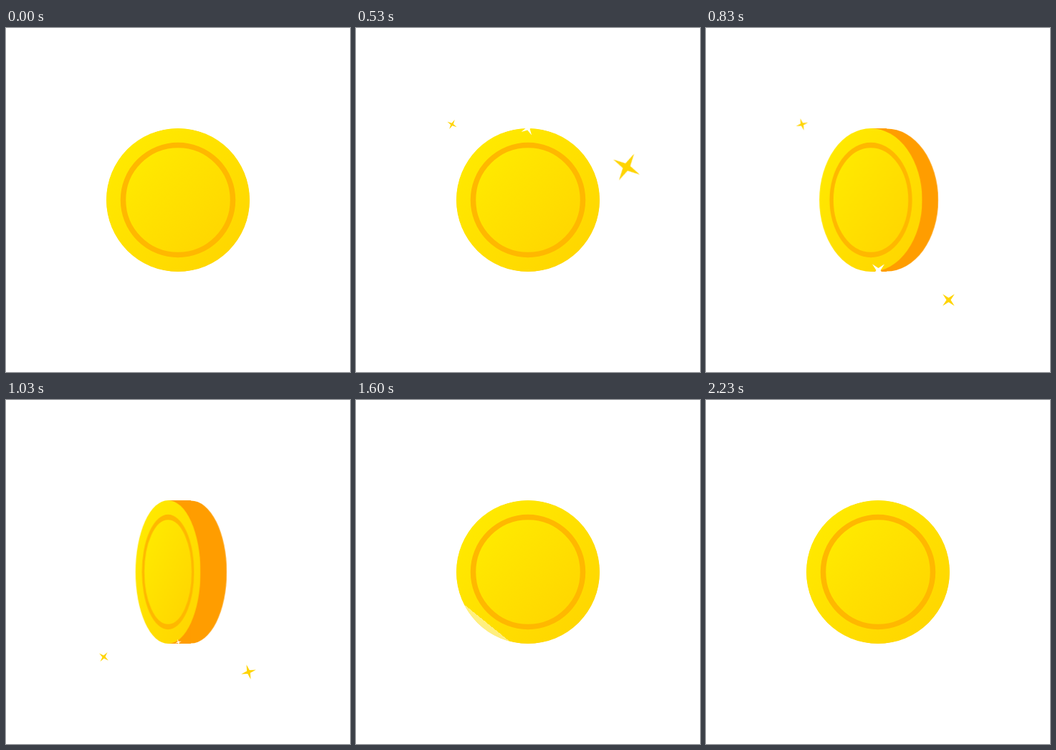
These frames come from a looping animation (480 px wide and 480 px high, 2560 ms). An HTML page without scripts:

```html
<!DOCTYPE html>
<html lang="en">
<head>
<meta charset="utf-8">
<title>Coin</title>
<style>
  html, body { margin: 0; width: 100%; height: 100%; overflow: hidden; background: #fff; }
  svg { display: block; width: 100vw; height: 100vh; }

  .face, .back, .rim, .shine { animation: 2.56s linear infinite; }
  .face { animation-name: face; }
  .back { animation-name: back; }
  .rim { animation-name: rim; }
  .shine { animation-name: sweep; }

  /* The coin tilts to the left and returns */
  @keyframes face {
    0%, 24.6% { transform: translateX(0) scaleX(1); animation-timing-function: ease-in; }
    32.42% { transform: translateX(-10px) scaleX(.72); animation-timing-function: ease-out; }
    41% { transform: translateX(-14px) scaleX(.45); animation-timing-function: ease-in; }
    48.05% { transform: translateX(-11px) scaleX(.66); animation-timing-function: ease-out; }
    57.4%, 100% { transform: translateX(0) scaleX(1); }
  }
  @keyframes back {
    0%, 24.6% { transform: translateX(0) scaleX(1); animation-timing-function: ease-in; }
    32.42% { transform: translateX(12px) scaleX(.725); animation-timing-function: ease-out; }
    41% { transform: translateX(18px) scaleX(.5); animation-timing-function: ease-in; }
    48.05% { transform: translateX(14px) scaleX(.72); animation-timing-function: ease-out; }
    57.4%, 100% { transform: translateX(0) scaleX(1); }
  }
  @keyframes rim {
    0%, 24.6% { transform: translateX(0) scaleX(0); animation-timing-function: ease-in; }
    32.42% { transform: translateX(-10px) scaleX(22); animation-timing-function: ease-out; }
    41% { transform: translateX(-14px) scaleX(32); animation-timing-function: ease-in; }
    48.05% { transform: translateX(-11px) scaleX(25); animation-timing-function: ease-out; }
    57.4%, 100% { transform: translateX(0) scaleX(0); }
  }
  @keyframes sweep {
    0%, 61.33% { transform: translateX(-22.5px); }
    89.84%, 100% { transform: translateX(525px); }
  }

  /* --t: start in ms, --a: first angle */
  .star {
    fill: #ffd400;
    animation: pop 2.56s ease-in-out infinite, spin 2.56s linear infinite;
    animation-delay: calc(var(--t) * 1ms - 2560ms);
  }
  .white { fill: #fff; }
  @keyframes pop {
    0%, 27.34%, 100% { scale: 0; }
    13.67% { scale: 1; }
  }
  @keyframes spin {
    0% { rotate: var(--a); }
    27.34%, 100% { rotate: calc(var(--a) + 100deg); }
  }
</style>
</head>
<body>
<svg viewBox="0 0 480 480">
  <defs>
    <linearGradient id="gold" x1="0" y1="0" x2="1" y2="1">
      <stop offset=".1" stop-color="#ffea00"/>
      <stop offset=".9" stop-color="#ffd600"/>
    </linearGradient>
    <clipPath id="disc"><circle r="100"/></clipPath>
    <path id="star" d="M0-1 .18-.18 1 0 .18 .18 0 1-.18 .18-1 0-.18-.18Z"/>
  </defs>

  <g transform="translate(240 240)">
    <g fill="#ff9d00">
      <circle class="back" r="99.6"/>
      <rect class="rim" y="-100" width="1" height="200"/>
    </g>
    <g class="face">
      <circle r="100" fill="url(#gold)"/>
      <circle r="76.5" fill="url(#gold)"/>
      <g clip-path="url(#disc)">
        <g transform="rotate(-51)">
          <g class="shine" fill="#fff" fill-opacity=".5">
            <rect x="-152" y="-110" width="60" height="220"/>
            <rect x="-355" y="-110" width="52" height="220"/>
          </g>
        </g>
      </g>
      <circle r="76.5" fill="none" stroke="#ffb800" stroke-width="7.5"/>
    </g>
  </g>

  <g transform="translate(377.5 194) scale(30)"><use href="#star" class="star" style="--t:50;--a:-39deg"/></g>
  <g transform="translate(134 134.5) scale(13)"><use href="#star" class="star" style="--t:340;--a:3deg"/></g>
  <g transform="translate(338.5 379.5) scale(13.5)"><use href="#star" class="star" style="--t:570;--a:8deg"/></g>
  <g transform="translate(136.5 358.5) scale(13)"><use href="#star" class="star" style="--t:830;--a:9deg"/></g>
  <g transform="translate(240 140) scale(12)"><use href="#star" class="star white" style="--t:100;--a:0deg"/></g>
  <g transform="translate(240.5 338) scale(12)"><use href="#star" class="star white" style="--t:480;--a:-5deg"/></g>
</svg>
</body>
</html>
```
